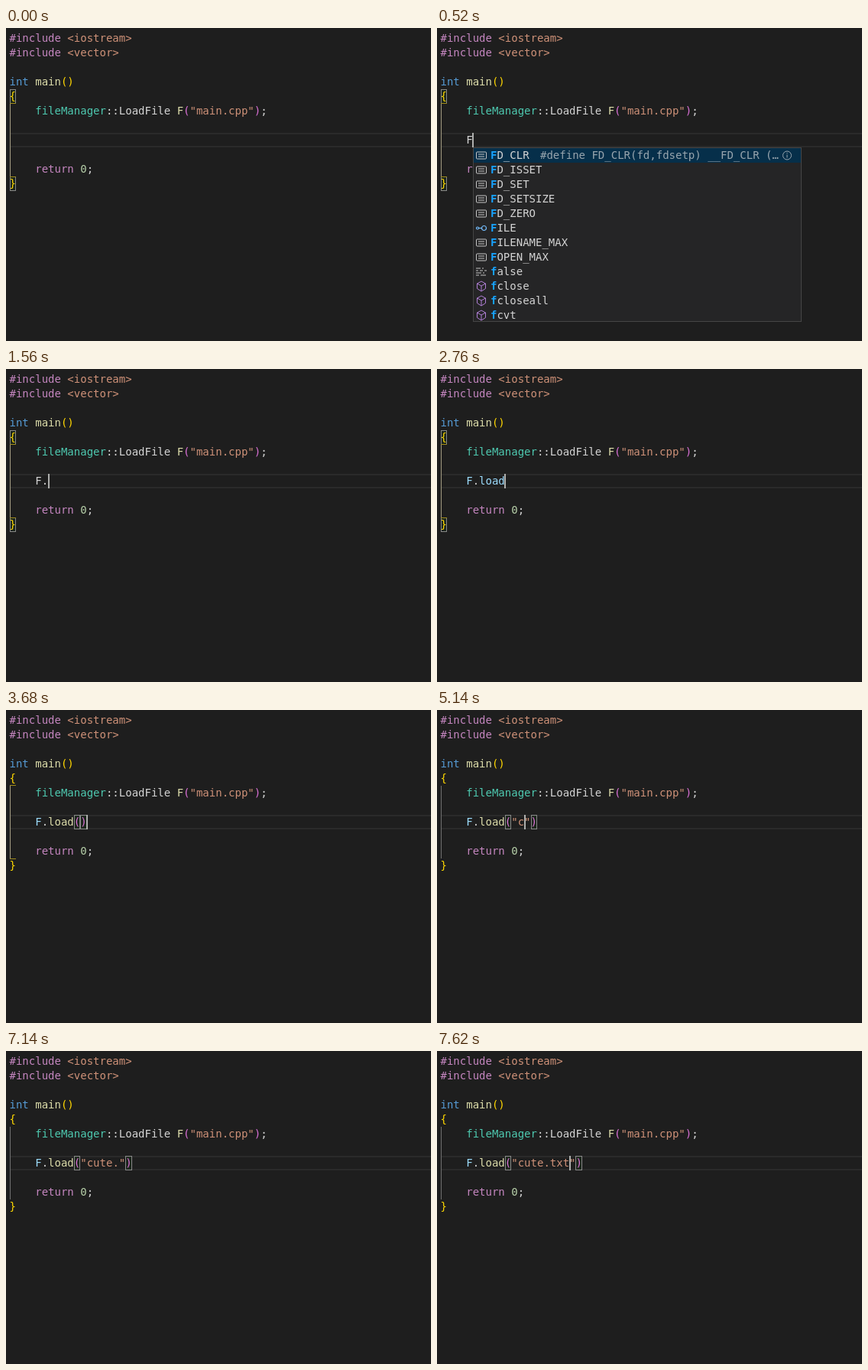
Recreate the animation shown at these times as an HTML page. Size 556 by 409 pixels, loop 8 s.

```html
<!DOCTYPE html>
<html lang="en">
<head>
<meta charset="utf-8">
<title>Typing a load call</title>
<style>
  html, body { margin: 0; width: 100%; height: 100%; overflow: hidden; background: #1e1e1e; }
  svg { display: block; }
  text { font: 14px "DejaVu Sans Mono", monospace; white-space: pre; fill: #d4d4d4; }
  .match { fill: #18a3ff; font-weight: bold; }
</style>
</head>
<body>
<svg id="stage" width="556" height="409" viewBox="0 0 556 409">
  <rect width="556" height="409" fill="#1e1e1e"/>
  <path d="M6 138H556M6 155H556" stroke="#2a2a2a" stroke-width="2"/>
  <g id="guides" fill="none"></g>
  <g id="code"></g>
  <g id="typed"></g>
  <rect id="caret" y="137" width="2" height="19" fill="#aeafad"/>
  <g id="menu"></g>
</svg>
<script>
const LOOP = 8000, LEFT = 4.5, CELL = 8.428, ROW = 19, TOP = 4;
const C = {
  plain: '#d4d4d4', key: '#c586c0', str: '#ce9178', type: '#4ec9b0', fn: '#dcdcaa',
  kw: '#569cd6', num: '#b5cea8', gold: '#ffd700', pink: '#da70d6', prop: '#9cdcfe'
};
const $ = id => document.getElementById(id);
const esc = s => s.replace(/&/g, '&amp;').replace(/</g, '&lt;').replace(/>/g, '&gt;');
const colX = col => LEFT + CELL * col;

// parts: colour name, text, colour name, text, ...
function line(row, col, ...parts) {
  let out = '';
  for (let i = 0; i < parts.length; i += 2)
    out += `<tspan fill="${C[parts[i]]}">${esc(parts[i + 1])}</tspan>`;
  return `<text x="${colX(col)}" y="${TOP + row * ROW + 14}">${out}</text>`;
}

function bracketBox(row, col) {
  const x = Math.round(colX(col) + .01), w = Math.round(colX(col + 1)) - x;
  return `<rect x="${x + .5}" y="${TOP + row * ROW + .5}" width="${w - 1}" height="18"
    fill="#006400" fill-opacity=".1" stroke="#888"/>`;
}

$('code').innerHTML =
  line(0, 0, 'key', '#include ', 'str', '<iostream>') +
  line(1, 0, 'key', '#include ', 'str', '<vector>') +
  line(3, 0, 'kw', 'int ', 'fn', 'main', 'gold', '()') +
  line(4, 0, 'gold', '{') +
  line(5, 4, 'type', 'fileManager', 'plain', '::LoadFile ', 'fn', 'F', 'pink', '(',
    'str', '"main.cpp"', 'pink', ')', 'plain', ';') +
  line(9, 4, 'key', 'return ', 'num', '0', 'plain', ';') +
  line(10, 0, 'gold', '}');

// Suggestion list; icons are drawn around the row's centre
const icons = {
  constant: `<g stroke="#c5c5c5"><rect x="-6.5" y="-4.5" width="13" height="9" rx="1"/>
    <path d="M-4 -1.5H4M-4 1.5H4"/></g>`,
  type: `<g stroke="#75beff" stroke-width="1.2"><circle cx="3.5" r="3"/>
    <circle cx="-5" r="1.5"/><path d="M-3.5 0H.5"/></g>`,
  word: `<path stroke="#c5c5c5" d="M-7 -4.5H-1M1 -4.5H3M-7 -1.5H-4M4 -1.5H7M-2 -1.5H2
    M-7 1.5H0M2 1.5H4M-7 4.5H-3M-1 4.5H6"/>`,
  method: `<path stroke="#b180d7" stroke-linejoin="round"
    d="M0 -6.5L5.5 -3.5V3L0 6.5L-5.5 3V-3.5ZM-5.5 -3.5L0 -.5L5.5 -3.5M0 -.5V6.5"/>`
};
const groups = {
  constant: 'FD_CLR FD_ISSET FD_SET FD_SETSIZE FD_ZERO',
  type: 'FILE',
  constant2: 'FILENAME_MAX FOPEN_MAX',
  word: 'false',
  method: 'fclose fcloseall fcvt'
};
const items = Object.entries(groups).flatMap(([kind, names]) =>
  names.split(' ').map(name => [kind.replace('2', ''), name]));

$('menu').innerHTML =
  '<rect x="47.5" y="156.5" width="429" height="227" fill="#252526" stroke="#454545"/>' +
  '<rect x="48" y="157" width="428" height="19" fill="#062f4a"/>' +
  items.map(([kind, name], i) => {
    const y = 157 + i * ROW;
    return `<g transform="translate(58 ${y + 9.5})" fill="none">${icons[kind]}</g>
      <text x="70" y="${y + 14}"><tspan class="match">${name[0]}</tspan>${name.slice(1)}</text>`;
  }).join('') +
  `<text x="135" y="171" style="fill:#98a5ae">#define FD_CLR(fd,fdsetp) __FD_CLR (…</text>
   <g fill="none" stroke="#98a5ae"><circle cx="458" cy="166.5" r="5.5"/>
   <path d="M458 165.5V169.5M458 163V164.2"/></g>
   <rect id="slider" x="467" y="157" width="9" height="20" fill="#797979" fill-opacity=".4"/>`;

// time, typed text, caret offset (negative: caret hidden)
const call = s => `F.load("${s}")`;
const steps = [
  [0, '', -1], [100, '', 0], [440, 'F', 1], [1000, 'F', -1],
  [1560, 'F.', 2], [2160, 'F.', -1], [2180, 'F.l', 3], [2380, 'F.lo', 4],
  [2440, 'F.loa', 5], [2760, 'F.load', 6], [3360, 'F.load', -1],
  [3540, 'F.load()', 7], [3680, 'F.load()', 8], [4100, 'F.load()', 7],
  [4340, call(''), 8], [4920, call(''), -1], [5140, call('c'), 9],
  [5340, call('cu'), 10], [5520, call('cut'), 11], [6020, call('cute'), 12],
  [6540, call('cute.'), 13], [7140, call('cute.'), -1], [7180, call('cute.t'), 14],
  [7440, call('cute.tx'), 15], [7620, call('cute.txt'), 16]
];

function typedLine(text, t) {
  const [, obj, dot, name, open, str, close] = text.match(/^(F?)(\.?)(\w*)(\(?)([^)]*)(\)?)$/);
  return line(7, 4, t < 2180 ? 'plain' : 'prop', obj, 'plain', dot,
    t < 3600 ? 'prop' : 'fn', name, 'pink', open, 'str', str, 'pink', close);
}

function guides(text, t) {
  const active = t < 3540 || (t >= 3680 && t < 4160);
  let out = `<path d="M5.5 99V194" stroke="${active ? '#a39c82' : '#707070'}"/>`;
  if (text.includes('('))
    out += bracketBox(7, 10) + bracketBox(7, 3 + text.length);
  else
    out += bracketBox(4, 0) + bracketBox(10, 0);
  if (active) out += '<path d="M5 98.5H13M5 194.5H13" stroke="#a08c1c"/>';
  return out;
}

const show = (id, on) => $(id).setAttribute('visibility', on ? 'inherit' : 'hidden');
const put = (id, html) => {
  const el = $(id);
  if (el.last !== html) el.innerHTML = el.last = html;
};

function draw(t) {
  const [, text, caret] = steps.filter(s => s[0] <= t).pop();
  put('typed', typedLine(text, t));
  put('guides', guides(text, t));
  show('caret', caret >= 0);
  $('caret').setAttribute('x', Math.floor(colX(4 + Math.max(caret, 0))));
  show('menu', t >= 520 && t < 1560);
  show('slider', t >= 640 && t < 1360);
}

// 'inherit' on the slider keeps it hidden along with its menu
let start;
function tick(now) {
  start ??= now;
  draw((now - start) % LOOP);
  requestAnimationFrame(tick);
}
draw(0);
requestAnimationFrame(tick);
</script>
</body>
</html>
```
